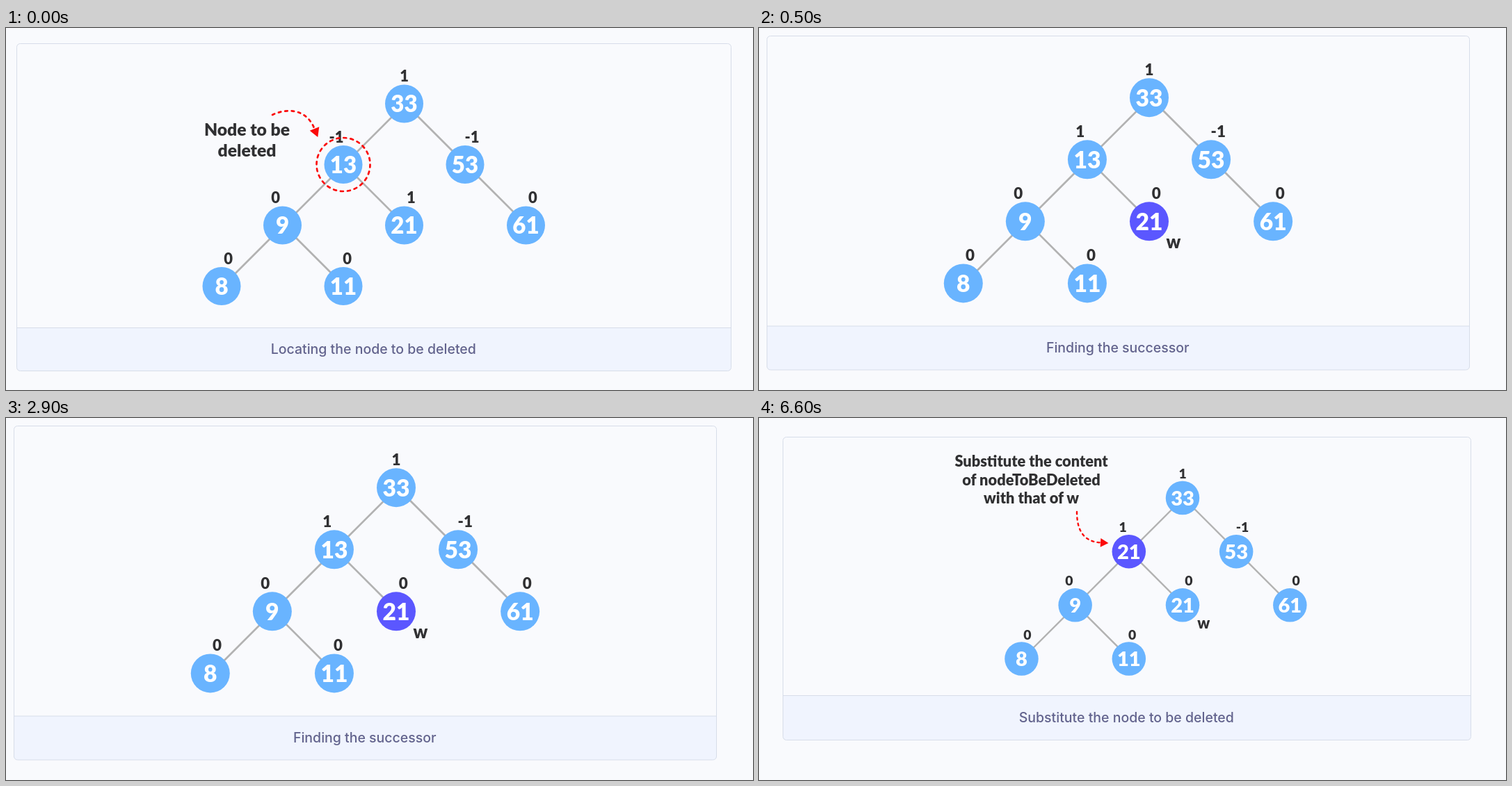
Recreate the animation shown at these times as an HTML page. Size 1074 px wide and 521 px high, loop 8 s.

```html
<!DOCTYPE html>
<html lang="en">
<head>
<meta charset="utf-8">
<title>Deleting a node from an AVL tree</title>
<style>
  html, body { margin: 0; width: 100%; height: 100%; overflow: hidden; background: #f9fafd; }
  svg { display: block; width: 100%; height: 100%; }
  text { font-family: Lato, sans-serif; font-weight: 900; fill: #303032; text-anchor: middle; }
  .key { fill: #fff; }
  .caption { font-family: Inter, sans-serif; font-weight: 500; fill: #62638d; }
  .edge { stroke: #b2b2b2; }
  .dashed { fill: none; stroke: #fb0a0a; stroke-linecap: round; }
  .head { fill: #fb0a0a; }
</style>
</head>
<body>
<svg viewBox="0 0 1074 521">
  <marker id="head" orient="auto" overflow="visible">
    <path class="head" d="M0 -2.7L4.8 0L0 2.7z"/>
  </marker>
  <g id="stage"></g>
</svg>
<script>
const DURATION = 8000;
const STEP = 87.5; // node spacing at scale 1
const RADIUS = 27.5;
const LINE = 2.7;
const BLUE = '#69b4ff', VIOLET = '#5b57ff';
const KEYS = [33, 13, 53, 9, 21, 61, 8, 11]; // insertion order

const SCENES = [
  {
    start: 0, scale: 1, root: { x: 572.5, y: 109 },
    card: { x: 15.5, y: 22.5, right: 1042.5, divider: 431.5, bottom: 493.5 },
    caption: 'Locating the node to be deleted',
    balances: { 13: -1, 21: 1 },
    ringed: 13,
    note: { lines: ['Node to be', 'deleted'], x: 346.5, y: 155 },
    arrow: 'M383 125C404 115 432 116 443.5 145'
  },
  {
    start: 500, scale: 1.018, root: { x: 561, y: 100.2 },
    card: { x: 11.5, y: 11.5, right: 1021.5, divider: 429, bottom: 492 },
    caption: 'Finding the successor',
    marked: 21, pointer: 21
  },
  {
    start: 4500, scale: 0.882, root: { x: 609, y: 115 },
    card: { x: 34.5, y: 27.5, right: 1023.5, divider: 399.5, bottom: 463.5 },
    caption: 'Substitute the node to be deleted',
    replaced: { 13: 21 },
    marked: 13, pointer: 21,
    note: { lines: ['Substitute the content', 'of nodeToBeDeleted', 'with that of w'], x: 391.5, y: 70 },
    arrow: 'M457 135C457 162 467 178 491 179.3'
  }
];

// Binary search tree; each node sits one column and one row from its parent.
function buildTree(keys) {
  const nodes = [];
  for (const key of keys) {
    const node = { key, col: 0, row: 0, side: 0 };
    let next = nodes[0];
    while (next) {
      const branch = key < next.key ? 'left' : 'right';
      const parent = next;
      next = parent[branch];
      if (!next) {
        const side = branch === 'left' ? -1 : 1;
        Object.assign(node, { parent, side, col: parent.col + side, row: parent.row + 1 });
        parent[branch] = node;
      }
    }
    nodes.push(node);
  }
  return nodes;
}

const height = node => node ? 1 + Math.max(height(node.left), height(node.right)) : 0;
const balance = node => height(node.left) - height(node.right);

const TREE = buildTree(KEYS);
const DEPTH = height(TREE[0]) - 1;

const label = (value, x, y, size, kind = '') =>
  `<text class="${kind}" x="${x}" y="${y}" font-size="${size}">${value}</text>`;

function drawCard({ x, y, right, divider, bottom }, caption) {
  const r = 5;
  return `<path fill="#f0f4fe" d="M${x} ${divider}H${right}V${bottom - r}q0 ${r} ${-r} ${r}H${x + r}q${-r} 0 ${-r} ${-r}z"/>
    <g fill="none" stroke="#d7dde9">
      <path d="M${x} ${divider}H${right}"/>
      <rect x="${x}" y="${y}" width="${right - x}" height="${bottom - y}" rx="${r}"/>
    </g>` + label(caption, (x + right) / 2 - 0.7, (divider + bottom) / 2 + 6, 19.5, 'caption');
}

// The tree is drawn at scale 1 around its root.
function drawTree({ root, scale, marked, ringed, pointer, balances = {}, replaced = {} }) {
  let edges = '', nodes = '';
  for (const node of TREE) {
    const { key, parent, side, row } = node;
    const x = node.col * STEP, y = row * STEP;
    if (parent) {
      edges += `<path class="edge" stroke-width="${LINE}" d="M${x + 1.4} ${y}l${-side * STEP} ${-STEP}"/>`;
    }
    const shift = row < DEPTH ? side * 10 : 7.5 - side * 2;
    nodes += `<circle cx="${x}" cy="${y}" r="${RADIUS}" fill="${key === marked ? VIOLET : BLUE}"/>` +
      label(replaced[key] ?? key, x, y + 12.2, 33, 'key') +
      label(balances[key] ?? balance(node), x + shift, y - 31.7, 22);
    if (key === pointer) nodes += label('w', x + 34.2, y + 38, 25);
    if (key === ringed) {
      nodes += `<circle class="dashed" cx="${x}" cy="${y}" r="38.5" stroke-width="${LINE}" stroke-dasharray="4 6.08"/>`;
    }
  }
  return `<g transform="translate(${root.x} ${root.y}) scale(${scale})">${edges}${nodes}</g>`;
}

const drawNote = ({ lines, x, y }, scale) =>
  lines.map((line, i) => label(line, x, y + i * 30.3 * scale, 24.7 * scale)).join('');

const drawArrow = (path, scale) =>
  `<path class="dashed" d="${path}" marker-end="url(#head)" stroke-width="${LINE * scale}"
    stroke-dasharray="${3.5 * scale} ${6 * scale}"/>`;

function drawScene(scene) {
  const { card, caption, scale, note, arrow } = scene;
  return drawCard(card, caption) + drawTree(scene) +
    (note ? drawNote(note, scale) : '') +
    (arrow ? drawArrow(arrow, scale) : '');
}

const stage = document.getElementById('stage');
let shown;

function render(time) {
  const scene = SCENES.findLast(({ start }) => start <= time % DURATION);
  if (scene === shown) return;
  stage.innerHTML = drawScene(scene);
  shown = scene;
}

const began = performance.now();
function tick() {
  render(performance.now() - began);
  requestAnimationFrame(tick);
}
tick();
</script>
</body>
</html>
```
